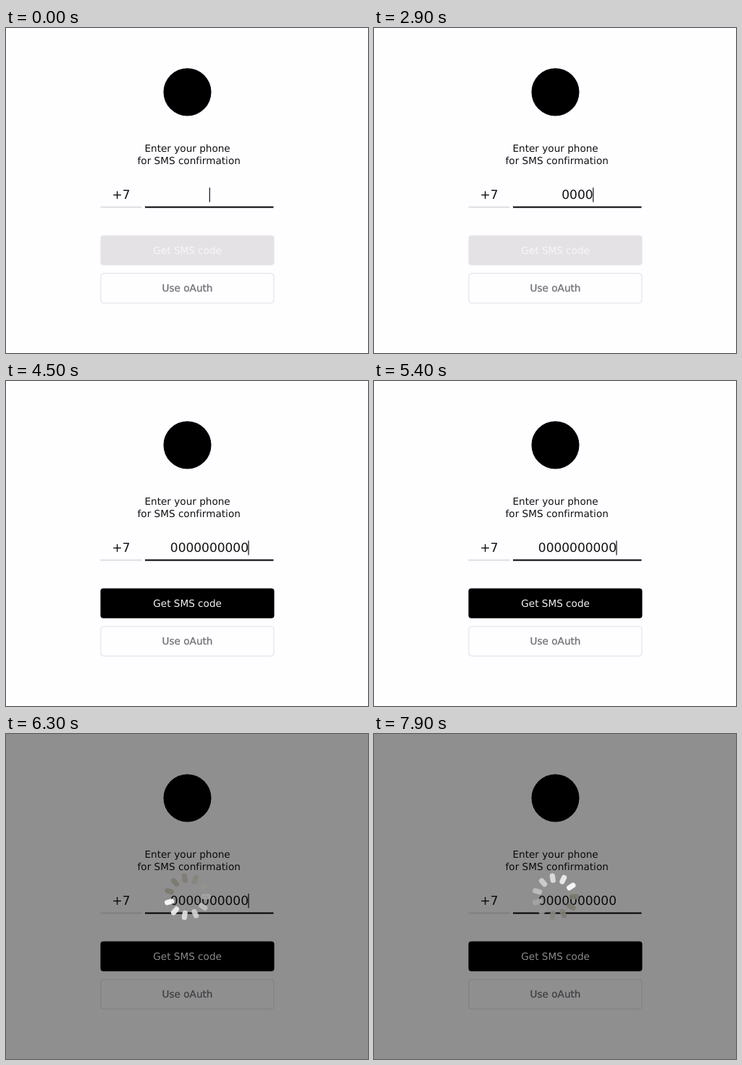
Recreate the animation shown at these times as an HTML page. Size 500x449 px, loop 8 s.

```html
<!DOCTYPE html>
<html lang="en">
<head>
<meta charset="utf-8">
<title>Phone sign-in</title>
<style>
  html, body { margin: 0; width: 100%; height: 100%; overflow: hidden; background: #fefdff; }
  svg { display: block; width: 100vw; height: 100vh; }
  text {
    font: 13.6px "DejaVu Sans", sans-serif; font-variant-ligatures: none;
    text-rendering: geometricPrecision; text-anchor: middle; fill: #111;
  }
  .entry { font-size: 17px; }
</style>
</head>
<body>
<svg viewBox="0 0 500 449">
  <rect width="500" height="449" fill="#fefdff"/>
  <circle cx="250.5" cy="88.5" r="33"/>

  <text x="250.6" y="170.6">Enter your phone</text>
  <text x="252.7" y="188.4">for SMS confirmation</text>

  <text class="entry" x="159" y="236.3">+7</text>
  <rect x="130.5" y="246.5" width="57" height="2" fill="#dfdde0"/>
  <text class="entry" id="digits" x="280.9" y="236.3"></text>
  <rect id="caret" y="220.5" width="1.2" height="20" fill="#111"/>
  <rect x="192" y="246.5" width="177.5" height="2" fill="#000"/>

  <rect id="send" x="130.5" y="286.5" width="240" height="41.3" rx="4"/>
  <text id="sendLabel" x="250.6" y="312.2">Get SMS code</text>
  <rect x="131" y="339" width="239" height="41" rx="4" fill="#fefdff" stroke="#dfdee2"/>
  <text x="250.5" y="364.4" style="fill:#727175;stroke:#727175;stroke-width:.3">Use oAuth</text>

  <g id="busy">
    <rect width="500" height="449" fill="#000" opacity=".435"/>
    <g id="spinner" transform="translate(250.5 224.7)"></g>
  </g>
</svg>
<script>
const LOOP = 8000, BUSY_AT = 5700, STEP = 100, PETALS = 11;
const KEY_TIMES = [2100, 2300, 2500, 2900, 3000, 3200, 3600, 3700, 4100, 4500];
const CARET_OFF = [[200, 600], [1400, 1800], [5000, 5400], [6700, 7100], [7900, 8000]];
// Petal shades from the leading one backwards
const SHADES = ['#fff', '#efefef', '#dfdfde', '#d0d0ce', '#bfbebc', '#a6a5a3',
                '#959391', '#87857d', '#807e73', '#7d7b6f', '#7d7b6f'];

const $ = id => document.getElementById(id);
const [digits, caret, send, sendLabel, busy, spinner] =
  ['digits', 'caret', 'send', 'sendLabel', 'busy', 'spinner'].map($);

const petals = Array.from({ length: PETALS }, (_, i) => {
  const petal = document.createElementNS('http://www.w3.org/2000/svg', 'rect');
  const attrs = { x: 19.3, y: -3.6, width: 13.2, height: 7.2, rx: 3.4,
                  opacity: .92, transform: `rotate(${i * 360 / PETALS})` };
  for (const name in attrs) petal.setAttribute(name, attrs[name]);
  return spinner.appendChild(petal);
});

const mod = (a, n) => ((a % n) + n) % n;

function draw(t) {
  const count = KEY_TIMES.filter(k => t >= k).length;
  const ready = count === KEY_TIMES.length;
  const hidden = CARET_OFF.some(([from, to]) => t >= from && t < to);

  digits.textContent = '0'.repeat(count);
  caret.setAttribute('x', 280.7 + count * 5.37);
  caret.style.visibility = hidden ? 'hidden' : 'visible';
  send.setAttribute('fill', ready ? '#000' : '#e4e2e5');
  sendLabel.style.fill = ready ? '#f2f2f2' : '#f7f6f9';

  busy.style.display = t >= BUSY_AT ? 'inline' : 'none';
  const lead = Math.floor((t - BUSY_AT) / STEP) - 1;
  petals.forEach((petal, i) => petal.setAttribute('fill', SHADES[mod(lead - i, PETALS)]));
}

const start = performance.now();
function tick() {
  draw((performance.now() - start) % LOOP);
  requestAnimationFrame(tick);
}
tick();
</script>
</body>
</html>
```
